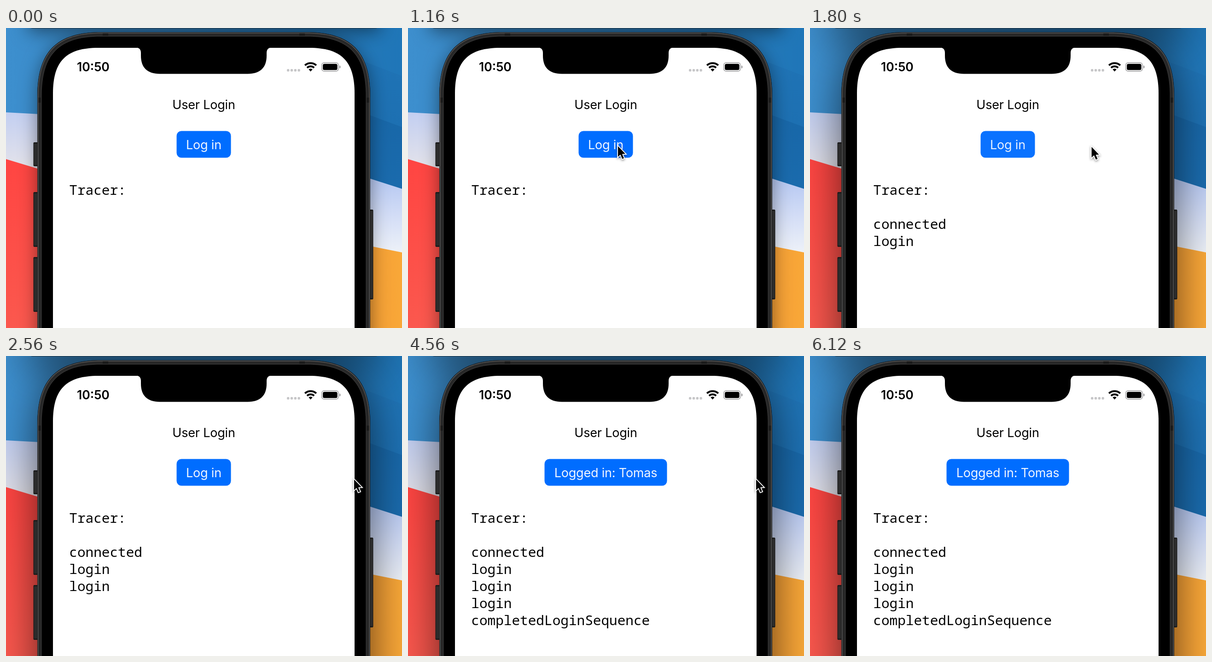
These frames come from a looping animation (860x651 px, 6220 ms). An HTML page with a canvas:

```html
<!DOCTYPE html>
<html lang="en">
<head>
<meta charset="utf-8">
<title>User Login</title>
<style>
  html, body { margin: 0; width: 100%; height: 100%; overflow: hidden; }
  canvas { display: block; }
</style>
</head>
<body>
<canvas id="stage" width="860" height="651"></canvas>
<script>
const W = 860, H = 651, LOOP = 6220;
const SANS = 'Inter, "Open Sans", sans-serif';
const MONO = '"Noto Sans Mono", "DejaVu Sans Mono", monospace';
const stage = document.getElementById('stage').getContext('2d');

const clamp = v => Math.min(1, Math.max(0, v));
const progress = (t, start, end) => clamp((t - start) / (end - start));
const smooth = u => u * u * (3 - 2 * u);
const mix = (a, b, u) => a + (b - a) * u;

function polygon(c, points, fill) {
  c.beginPath();
  points.forEach(([x, y]) => c.lineTo(x, y));
  c.closePath();
  if (fill) { c.fillStyle = fill; c.fill(); }
}

function box(c, x, y, w, h, r, fill) {
  c.beginPath();
  c.roundRect(x, y, w, h, r);
  c.fillStyle = fill;
  c.fill();
}

function ramp(c, x0, y0, x1, y1, ...colors) {
  const g = c.createLinearGradient(x0, y0, x1, y1);
  colors.forEach((color, i) => g.addColorStop(i / (colors.length - 1), color));
  return g;
}

function text(c, str, x, y, font, color, align = 'left', spacing = 0) {
  c.font = font;
  c.fillStyle = color;
  c.textAlign = align;
  c.letterSpacing = spacing + 'px';
  c.fillText(str, x, y);
}

const mono = (c, str, y) => text(c, str, 137.3, y, '29.4px ' + MONO, '#000');

// Phone outline with continuous corners, shrunk by the inset.
function shell(c, inset, fill) {
  const l = 68 + inset, r = 791 - inset, t = 9 + inset;
  const radius = 113 - inset, e = radius * 1.25, k = radius * 0.365;
  c.beginPath();
  c.moveTo(l, 900);
  c.lineTo(l, t + e);
  c.bezierCurveTo(l, t + k, l + k, t, l + e, t);
  c.lineTo(r - e, t);
  c.bezierCurveTo(r - k, t, r, t + k, r, t + e);
  c.lineTo(r, 900);
  c.closePath();
  c.fillStyle = fill;
  c.fill();
}

function wallpaper(c) {
  c.fillStyle = ramp(c, 0, 0, W, 0, '#3d8fce', '#2f80bf', '#1f76b8');
  c.fillRect(0, 0, W, H);
  polygon(c, [[0, 183], [430, 206], [430, 400], [0, 400]],
    ramp(c, 0, 184, 0, 305, '#c3cff1', '#e4e3ea'));
  polygon(c, [[0, 284.5], [68, 305], [430, 420], [430, H], [0, H]],
    ramp(c, 0, 285, 0, H, '#ff4542', '#fb584e'));

  polygon(c, [[760, 66], [W, 104], [W, 400], [760, 400]],
    ramp(c, 0, 75, 0, 220, '#1f73b5', '#1d70b2'));
  polygon(c, [[760, 178], [W, 215], [W, 400], [760, 400]],
    ramp(c, 0, 190, 0, 348, '#1867a8', '#1a6bad'));
  polygon(c, [[760, 317], [W, 349], [W, 520], [760, 520]],
    ramp(c, 0, 328, 0, 487, '#b6c8f2', '#d3ddf6', '#edf1f8'));
  polygon(c, [[760, 467], [W, 487], [W, H], [760, H]],
    ramp(c, 760, 0, W, 0, '#f29a34', '#f9a838'));
}

function shadow(c, blur, alpha, dy) {
  c.shadowBlur = blur;
  c.shadowColor = `rgba(0,0,0,${alpha})`;
  c.shadowOffsetY = dy;
}

function statusBar(c) {
  text(c, '10:50', 154, 94.3, '600 26.5px ' + SANS, '#000');
  for (let i = 0; i < 4; i++) box(c, 610 + i * 7.8, 89, 5.4, 5.4, 2, '#c6c6c8');

  const x = 661.5, y = 94.5, up = -Math.PI / 2, spread = 0.74;
  c.strokeStyle = '#000';
  c.lineWidth = 4;
  for (const r of [18.3, 11.3]) {
    c.beginPath();
    c.arc(x, y, r, up - spread, up + spread);
    c.stroke();
  }
  c.beginPath();
  c.moveTo(x, y);
  c.arc(x, y, 6.3, up - spread, up + spread);
  c.fillStyle = '#000';
  c.fill();

  c.beginPath();
  c.roundRect(685.6, 75.2, 36.4, 18.6, 5.5);
  c.strokeStyle = '#9c9c9e';
  c.lineWidth = 1.5;
  c.stroke();
  box(c, 688, 77.7, 31.6, 13.6, 3.5, '#000');
  box(c, 724, 81.5, 2.4, 6, [0, 2, 2, 0], '#9c9c9e');
}

function phone(c) {
  for (const [y, h] of [[248, 52], [356, 119], [497, 119]]) {
    box(c, 59.5, y, 11, h, 2, '#1c1c1c');
    box(c, 61, y + 3, 8, h - 6, 1, '#2c2c2c');
  }
  box(c, 788, 394, 9.5, 195, 2, '#1c1c1c');
  box(c, 789, 397, 7, 189, 1, '#2c2c2c');

  shell(c, 0, '#181818');
  shell(c, 1, '#5c5c5c');
  shell(c, 2.4, '#272727');
  c.fillStyle = '#1b1b1b';
  for (const x of [70.5, 782]) c.fillRect(x, 151, 6.5, 11);
  for (const x of [210, 637]) c.fillRect(x, 11.5, 12, 6);
  shell(c, 8, '#363636');
  shell(c, 9.5, '#000');
  shell(c, 34, '#fff');

  c.beginPath();
  c.moveTo(282, 42);
  c.quadraticCurveTo(293, 43, 293, 54);
  c.lineTo(293, 60);
  c.bezierCurveTo(293, 86, 307, 99.5, 334, 99.5);
  c.lineTo(525, 99.5);
  c.bezierCurveTo(552, 99.5, 566, 86, 566, 60);
  c.lineTo(566, 54);
  c.quadraticCurveTo(566, 43, 577, 42);
  c.closePath();
  c.fillStyle = '#000';
  c.fill();
  statusBar(c);
}

// The window casts a deeper shadow once it becomes active.
function backdrop(active) {
  const canvas = document.createElement('canvas');
  canvas.width = W;
  canvas.height = H;
  const c = canvas.getContext('2d');
  wallpaper(c);
  c.save();
  if (active) shadow(c, 90, 0.6, 22);
  else shadow(c, 38, 0.45, 8);
  shell(c, 0, '#000');
  box(c, 48, -70, 764, 71, 10, '#263a48');
  c.restore();
  phone(c);
  text(c, 'User Login', 429.5, 176, '27px ' + SANS, '#000', 'center', -0.2);
  mono(c, 'Tracer:', 362);
  return canvas;
}

function button(t) {
  const done = t >= 4560;
  const width = done ? 266 : 118;
  const pressed = t < 1440 ? 0 : t < 1600 ? 0.25 : 0.25 * Math.exp((1600 - t) / 110);
  stage.globalAlpha = 1 - pressed;
  box(stage, 429.5 - width / 2, 223.5, width, 58, 10.5, '#006dff');
  text(stage, done ? 'Logged in: Tomas' : 'Log in', 429.5, 262.5,
    '27px ' + SANS, '#f0f6ff', 'center', -0.2);
  stage.globalAlpha = 1;
}

const LOG = [
  [1600, 'connected'], [1600, 'login'], [2560, 'login'],
  [3560, 'login'], [4560, 'completedLoginSequence']
];

function trace(t) {
  LOG.forEach(([time, line], i) => {
    if (t >= time) mono(stage, line, 436 + i * 37);
  });
}

function pointerAt(t) {
  if (t < 760) {
    const left = 1 - progress(t, 120, 680);
    return [mix(494, -2, left ** 1.16), mix(219, 573, left ** 1.8)];
  }
  if (t < 1560) {
    const u = smooth(progress(t, 720, 1160));
    return [mix(494, 456, u), mix(219, 256.5, u)];
  }
  if (t < 5800) {
    const u = smooth(progress(t, 1560, 1960) ** 1.32);
    return [mix(456, 756, u), mix(256.5, 268, u * u * u)];
  }
  const u = progress(t, 5800, 6120) ** 1.5;
  return [mix(756, 776, u), mix(268, -45, u)];
}

const ARROW = [[0, 0], [0, 23], [5.3, 18.2], [9.3, 27.5], [13, 26], [9, 17], [16, 16.6]];

function pointer(t) {
  if (t < 120 || t >= 6120) return;
  stage.save();
  stage.translate(...pointerAt(t));
  polygon(stage, ARROW);
  shadow(stage, 5, 0.45, 2);
  stage.strokeStyle = '#fff';
  stage.lineWidth = 3.6;
  stage.stroke();
  shadow(stage, 0, 0, 0);
  stage.fillStyle = '#000';
  stage.fill();
  stage.restore();
}

const idle = backdrop(false), active = backdrop(true);
const start = performance.now();

function frame() {
  const t = (performance.now() - start) % LOOP;
  stage.drawImage(t < 1440 ? idle : active, 0, 0);
  button(t);
  trace(t);
  pointer(t);
  requestAnimationFrame(frame);
}
frame();
</script>
</body>
</html>
```
